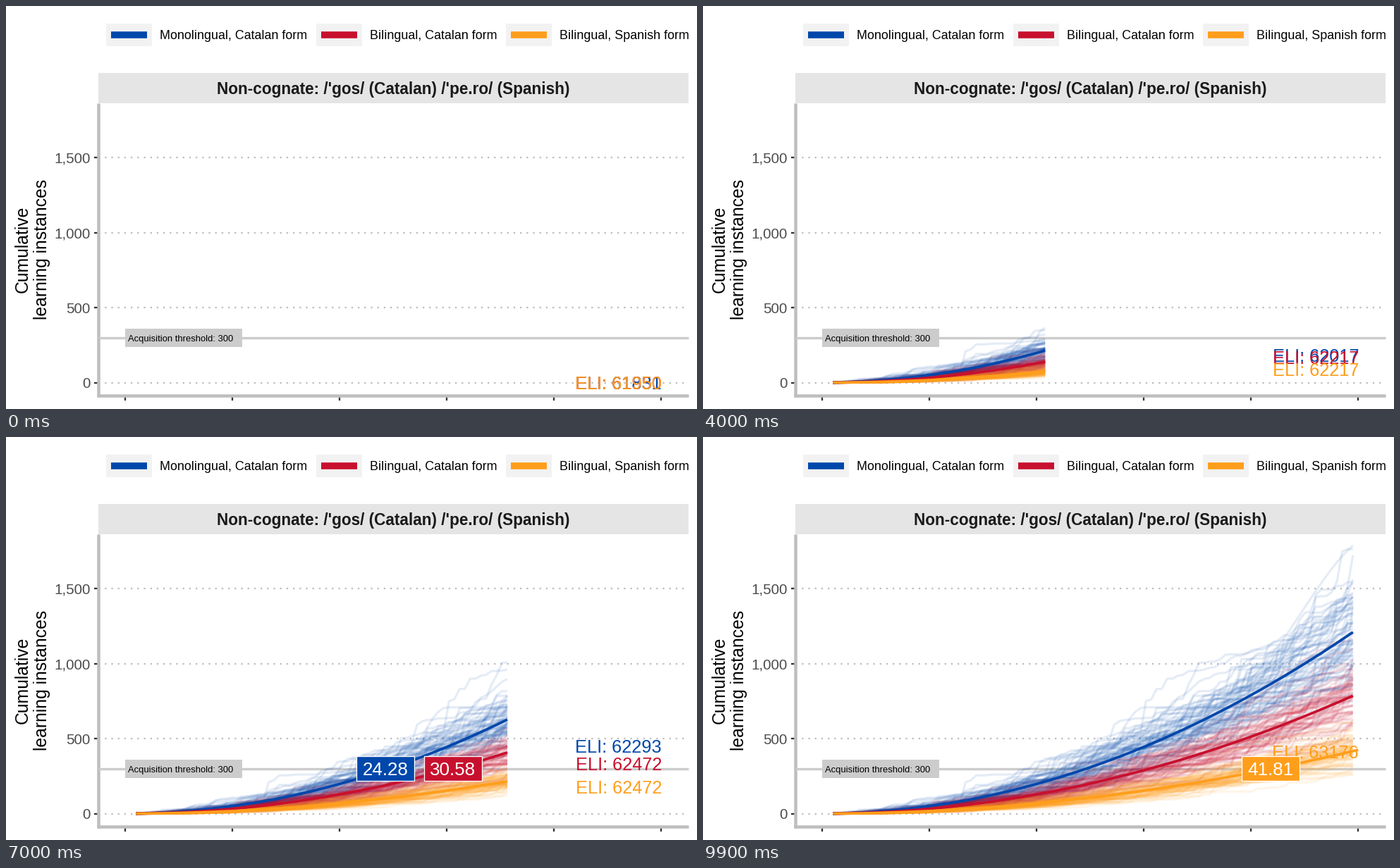
A matplotlib script for the animation above (10000 ms loop, 980 by 572 pixels).

```python
import numpy as np
import matplotlib.pyplot as plt
from matplotlib.animation import FuncAnimation
from matplotlib.collections import LineCollection
from matplotlib.patches import Rectangle

W, H, PT = 980, 572, 0.72  # stage in pixels, points per pixel
FRAMES, PEOPLE, THRESHOLD = 100, 65, 300
BLUE, RED, ORANGE = "#0047AB", "#C8102E", "#FF9E1B"
GREY = "#BEBEBE"
ELI_SIZE = 25.4

plt.rcParams["font.family"] = "Liberation Sans"
fig = plt.figure(figsize=(W / 100, H / 100), dpi=100, facecolor="white")
ax = fig.add_axes([0, 0, 1, 1])
ax.set(xlim=(0, W), ylim=(H, 0))
ax.axis("off")

months = np.linspace(1, 50, FRAMES)


def px(month):
    return 169 + 15.205 * month


def py(value):
    return 534.5 - 0.2127 * value


def box(x0, y0, x1, y1, color, z=1, lw=0, **kw):
    return ax.add_patch(Rectangle((x0, y0), x1 - x0, y1 - y0, fc=color,
                                  lw=lw * PT, zorder=z, **kw))


def line(x, y, color, width, z=1, **kw):
    return ax.plot(x, y, color=color, lw=width * PT, zorder=z,
                   solid_capstyle="butt", dash_capstyle="butt", **kw)[0]


def text(x, y, s, size, color="black", z=5, **kw):
    """Text whose capitals are centred on y."""
    return ax.text(x, y + 0.358 * size, s, fontsize=size * PT, color=color,
                   va="baseline", zorder=z, **kw)


def draw_legend():
    for x, color, name in ((142, BLUE, "Monolingual, Catalan form"),
                           (440, RED, "Bilingual, Catalan form"),
                           (709, ORANGE, "Bilingual, Spanish form")):
        box(x, 25, x + 64.5, 57, "#F2F2F2")
        line([x + 7, x + 58], [41, 41], color, 9.6)
        text(x + 76, 41, name, 17.85)


def draw_panel():
    box(130.5, 94.5, 967.5, 138, "#E5E5E5")
    text(549, 116.5, "Non-cognate: /'gos/ (Catalan) /'pe.ro/ (Spanish)", 22.65,
         "#1A1A1A", ha="center", weight="bold")

    for value in range(0, 1501, 500):
        y = py(value)
        line([131, 967.5], [y, y], GREY, 2.3, linestyle=(0, (1, 3)))
        line([124.5, 131], [y, y], "#333333", 2.3)
        text(119.5, y, f"{value:,}", 20.6, "#4D4D4D", ha="right")
    for month in range(0, 51, 10):
        line([px(month)] * 2, [553, 559.5], "#333333", 2.3)
    line([131, 131], [138, 555], GREY, 4.5, 2)
    line([129, 967.5], [553, 553], GREY, 4.5, 2)

    y = py(THRESHOLD)
    line([131, 967.5], [y, y], "#CCCCCC", 3.4, 2)
    box(169, 458, 335, 484, "#CCCCCC", 2)
    text(173, 471, f"Acquisition threshold: {THRESHOLD}", 13)

    for x, s in ((31, "Cumulative"), (58, "learning instances")):
        ax.text(x, 345, s, fontsize=24.8 * PT, rotation=90, ha="center",
                va="baseline", rotation_mode="anchor")


def growth(total):
    """Learning instances grow with the square of age."""
    return total * (months / 50) ** 2


def surge(total, month, gain, width):
    """A child who runs ahead around one month, then waits for the rest."""
    lead = gain * np.exp(-((months - month) / width) ** 2)
    return np.maximum.accumulate(growth(total) * (1 + lead))


class Group:
    def __init__(self, color, total, crossing, eli, rate, z, rng, extra=()):
        self.crossing, self.eli, self.rate = crossing, eli, rate
        mean = growth(total)
        self.mean = np.column_stack([px(months), py(mean)])

        # Random bursts of learning, and a personal pace.
        bursts = rng.gamma(0.5, 2, (PEOPLE, FRAMES))
        pace = rng.lognormal(0, 0.1, (PEOPLE, 1))
        values = np.cumsum(np.diff(mean, prepend=0) * bursts, axis=1) * pace
        values = np.vstack([values, *extra])
        xs = np.broadcast_to(px(months), values.shape)
        self.paths = np.stack([xs, py(values)], axis=2)

        self.people = LineCollection([], colors=color, alpha=0.1,
                                     linewidths=3.2 * PT, zorder=3 + z)
        self.people.set_capstyle("butt")
        ax.add_collection(self.people)
        self.line = line([], [], color, 3.7, 4 + z)
        self.count = text(930, 0, "", ELI_SIZE, color, 5 + z, ha="right")

        x, y = px(crossing), py(THRESHOLD)
        self.label = [box(x - 41, y - 17.7, x + 41, y + 17.7, color, 6,
                          lw=1.3, ec="white"),
                      text(x, y, f"{crossing:.2f}", 26, "white", 7, ha="center")]

    def update(self, n, stays):
        visible = stays or n < FRAMES - 1
        cut = min(n + 1, FRAMES - 1)
        self.people.set_segments(list(self.paths[:, :cut]) if n else [])
        self.line.set_data(*self.mean[:n + 1 if stays else cut].T)

        # The counter rises with the input heard so far.
        eli = np.interp(n, ELI_STEPS, self.eli)
        self.count.set_text(f"ELI: {eli:.0f}")
        self.count.set_y(py(self.rate * (eli - self.eli[0])) + 0.358 * ELI_SIZE)
        self.count.set_visible(visible)
        for part in self.label:
            part.set_visible(bool(visible and months[n] >= self.crossing))


draw_legend()
draw_panel()

ELI_STEPS = [0, 23, 40, 50, 70, 82, 99]
mono = [61831, 61922, 62017, 62085, 62293, 62407, 62600]
bilingual = [61950, 61997, 62217, 62290, 62472, 62710, 63176]

rng = np.random.default_rng(11)
leaders = [surge(1235, 49, 0.48, 8), surge(1235, 29.5, 0.62, 2.5)]
groups = [Group(BLUE, 1235, 24.28, mono, 0.97, 0, rng, leaders),
          Group(RED, 802, 30.58, bilingual, 0.633, 0.1, rng),
          Group(ORANGE, 425, 41.81, bilingual, 0.335, 0.2, rng)]


def update(n):
    for g in groups:
        g.update(n, stays=g is groups[-1])


anim = FuncAnimation(fig, update, frames=FRAMES, interval=100, repeat=True,
                     repeat_delay=0, blit=False)
plt.show()
```
